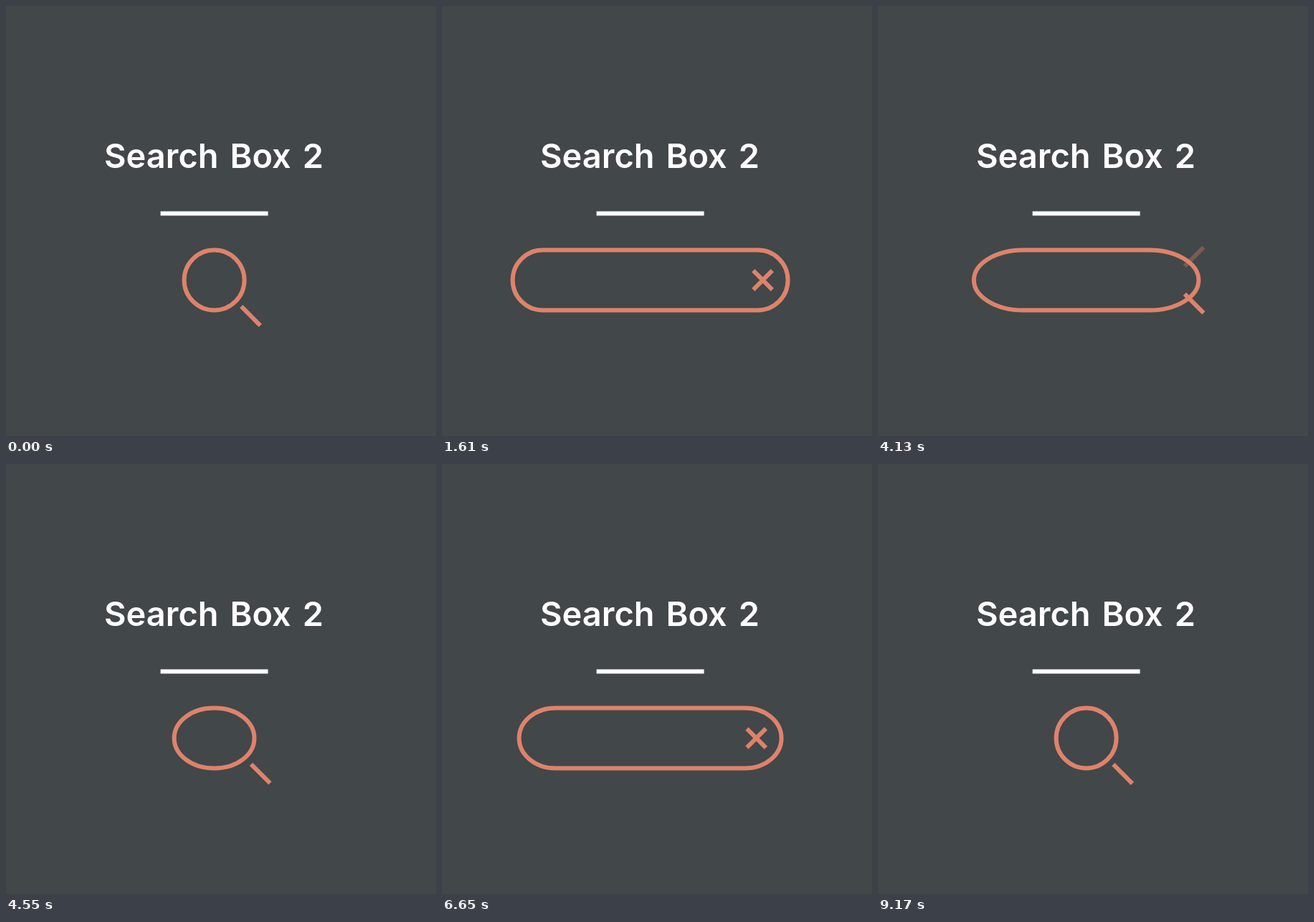
These frames come from a looping animation (600 px wide and 600 px high, 9.45 s). An HTML page with a canvas:

```html
<!DOCTYPE html>
<html lang="en">
<head>
<meta charset="utf-8">
<title>Search Box 2</title>
<style>
  html, body { margin: 0; height: 100%; overflow: hidden; background: #424749; }
  canvas { display: block; width: 600px; height: 600px; }
</style>
</head>
<body>
<canvas id="stage" width="600" height="600"></canvas>
<script>
const ctx = document.getElementById('stage').getContext('2d');
const LOOP = 9450, STEP = 70, BLINK = 560;
const BOX_MS = 930, HANDLE_MS = 820;
const CX = 290.6, CY = 382.5, HEIGHT = 90, BORDER = 6;
const BG = '#424749', CORAL = '#de836b', WHITE = '#fff';
const QUERY = 'puwolta';
const visits = [
  { open: 622, close: 3818, keys: [1680, 1890, 2170, 2380, 2520, 2590, 2730] },
  { open: 5880, close: 7870, keys: [] }
];

const mix = (a, b, k) => a + (b - a) * k;

function bezier(x1, y1, x2, y2) {
  const at = (a, b, s) => 3 * (1 - s) ** 2 * s * a + 3 * (1 - s) * s * s * b + s ** 3;
  return x => {
    if (x <= 0) return 0;
    if (x >= 1) return 1;
    let lo = 0, hi = 1;
    for (let i = 0; i < 24; i++) {
      const mid = (lo + hi) / 2;
      if (at(x1, x2, mid) < x) lo = mid; else hi = mid;
    }
    return at(y1, y2, lo);
  };
}
const ease = bezier(.25, .1, .25, 1);
const easeInOut = bezier(.42, 0, .58, 1);

function openness(t, visit, duration, curve) {
  return t < visit.close
    ? curve((t - visit.open) / duration)
    : 1 - curve((t - visit.close) / duration);
}

function drawTitle() {
  ctx.fillStyle = WHITE;
  ctx.font = '600 47px Inter, sans-serif';
  ctx.wordSpacing = '4px';
  ctx.textAlign = 'center';
  ctx.fillText('Search Box 2', 290, 226);
  ctx.wordSpacing = '0px';
  ctx.fillStyle = '#fffefa';
  ctx.fillRect(CX - 75, 286.5, 150, 6);
}

function drawBar(x, y, angle, alpha) {
  ctx.save();
  ctx.globalAlpha = alpha;
  ctx.translate(x, y);
  ctx.rotate(angle);
  ctx.fillStyle = CORAL;
  ctx.fillRect(-18.75, -3, 37.5, 6);
  ctx.restore();
}

function drawBox(width, p) {
  const half = BORDER / 2;
  const rx = mix(width / 2, HEIGHT / 2, p);
  ctx.beginPath();
  ctx.roundRect(CX - width / 2 + half, CY - HEIGHT / 2 + half, width - BORDER, HEIGHT - BORDER,
    { x: rx - half, y: HEIGHT / 2 - half });
  ctx.strokeStyle = CORAL;
  ctx.lineWidth = BORDER;
  ctx.stroke();
}

function drawInput(t, visit, x) {
  const focus = visit.open + STEP;
  if (t < focus || t >= visit.close) return;
  const typed = visit.keys.filter(k => k <= t);
  const text = QUERY.slice(0, typed.length);
  ctx.font = '23.5px Inter, sans-serif';
  ctx.textAlign = 'left';
  ctx.fillStyle = WHITE;
  ctx.fillText(text, x, 391);
  const lastEvent = typed.length ? typed[typed.length - 1] : focus;
  if (Math.floor((t - lastEvent) / BLINK) % 2 === 0) {
    ctx.fillRect(x + ctx.measureText(text).width - .7, 365, 1.4, 34);
  }
}

function draw(t) {
  const visit = visits[t < visits[1].open ? 0 : 1];
  const p = openness(t, visit, BOX_MS, easeInOut);
  const q = openness(t, visit, HANDLE_MS, ease);
  const width = mix(HEIGHT, 390, p);

  ctx.fillStyle = BG;
  ctx.fillRect(0, 0, 600, 600);
  drawTitle();
  drawBox(width, p);
  drawInput(t, visit, CX - width / 2 + BORDER + 15 * p);

  const barX = CX + width / 2 + mix(6, -38, q);
  const lift = mix(50, 0, q);
  drawBar(barX, CY - lift, -Math.PI / 4, q);
  drawBar(barX, CY + lift, Math.PI / 4, 1);
}

const start = performance.now();
function tick() {
  const t = (performance.now() - start) % LOOP;
  draw(Math.floor(t / STEP) * STEP);
  requestAnimationFrame(tick);
}
tick();
</script>
</body>
</html>
```
